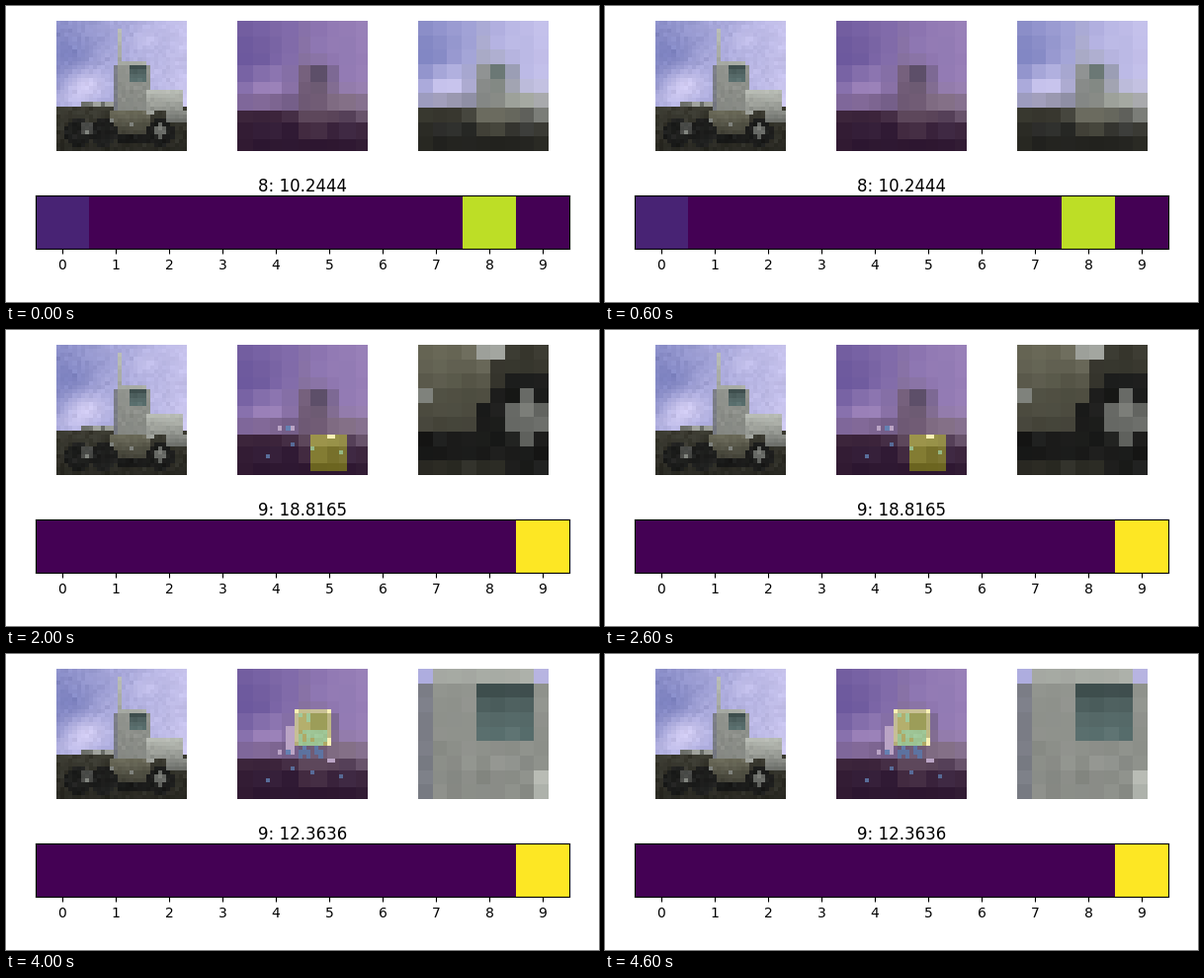
Animation, 600 px wide and 300 px high, one loop 5 s. Source, as a matplotlib script:

```python
import numpy as np
import matplotlib.pyplot as plt
from matplotlib.animation import FuncAnimation

W, H = 600, 300
N, G = 32, 9            # image side, glimpse side
ALPHA = 0.34

# title, class probabilities, glimpse corner (col, row)
STEPS = [
    ("8: 10.2444", {0: 0.1, 8: 0.9}, None),
    ("9: 13.4599", {8: 0.2, 9: 0.8}, (6, 20)),
    ("9: 18.8165", {9: 1.0}, (18, 22)),
    ("9: 14.9782", {9: 1.0}, (12, 14)),
    ("9: 12.3636", {9: 1.0}, (14, 10)),
]

rng = np.random.default_rng(4)
rows, cols = np.mgrid[0:N, 0:N]
BLUE, LILAC = np.array([118, 124, 188]), np.array([208, 203, 242])
STEEL, OLIVE = np.array([1, 1.02, 0.98]), np.array([1.03, 1.02, 0.86])


def blob(c, r, w, h):
    return np.exp(-((cols - c) / w) ** 2 - ((rows - r) / h) ** 2)


def make_sky():
    """Blue to lilac from left to right, with soft clouds."""
    t = 0.22 + 0.7 * cols / N
    t += 0.5 * blob(7, 15, 6, 4) + 0.4 * blob(1, 19, 7, 3)
    t -= 0.2 * blob(4, 8, 5, 4)
    for c, r in rng.uniform(0, N, (24, 2)):
        t += rng.normal(0, 0.1) * blob(c, r, 3.5, 2.5)
    t = np.clip(t, 0, 1.1)[..., None]
    return (1 - t) * BLUE + t * LILAC


def make_scene():
    """A lorry in flat grey blocks, one cell per pixel."""
    img = make_sky()

    def block(c, r, w, h, top, bottom=None, tint=STEEL):
        shade = np.linspace(top, top if bottom is None else bottom, h)
        img[r:r + h, c:c + w] = shade[:, None, None] * tint

    def disc(c, r, radius, level):
        img[np.hypot(cols - c, rows - r) <= radius] = level * STEEL

    block(0, 21, N, 11, 58, 40, OLIVE)          # road and flatbed
    block(6, 20, 9, 1, 112)
    block(15, 2, 1, 9, 185, 160)                # exhaust
    block(14, 11, 9, 11, 146, 134)              # cab
    block(15, 10, 7, 1, 168)
    img[11:22, 14] *= [0.88, 0.88, 0.98]
    block(18, 11, 4, 4, 78, 108, [0.85, 1.05, 1.04])
    block(22, 17, 9, 5, 186, 148)               # hood
    block(27, 22, 5, 3, 136, 112)
    block(13, 22, 10, 6, 104, 66, OLIVE)        # tank and steps
    block(15, 28, 9, 2, 25)
    block(22, 22, 2, 1, 162)

    for c in (5, 11, 25):                       # wheels
        disc(c, 27, 3.2, 30)
    disc(7, 26, 1.5, 72)
    disc(25, 26.5, 1.5, 103)
    for c, r in ((7, 27), (13, 24), (18, 25), (25, 26), (9, 20), (12, 20)):
        img[r, c:c + 1 + (r == 20)] = 128 * STEEL + 30 * (r == 20)

    img += rng.normal(0, 3.5, (N, N, 1))
    return np.clip(img, 0, 255) / 255


def pool(img):
    lo = np.arange(G) * N // G
    hi = -(-np.arange(1, G + 1) * N // G)
    return np.array([[img[a:b, c:d].mean((0, 1)) for c, d in zip(lo, hi)]
                     for a, b in zip(lo, hi)])


scene = make_scene()
coarse = pool(scene)
idx = np.arange(N) * G // N
blurred = coarse[idx][:, idx]


def window(corner):
    c, r = corner
    return slice(r, r + G), slice(c, c + G)


def mask(*corners):
    m = np.zeros((N, N))
    for corner in filter(None, corners):
        m[window(corner)] = 1
    return m


def memory(step):
    """Blurred scene, lit up where past glimpses found bright detail."""
    seen = mask(*(s[2] for s in STEPS[:step + 1])) > 0
    fine = scene.mean(2)
    lit = seen & (fine > np.maximum(blurred.mean(2), 0.45))
    out = blurred.copy()
    out[lit] = np.clip(scene[lit] * [0.78, 1.25, 1.5], 0, 1)
    out[lit & (fine > 0.61)] = [0.97, 0.97, 1]
    return out


fig = plt.figure(figsize=(W / 100, H / 100), dpi=100, facecolor="white")


def panel(x, y, w, h):
    return fig.add_axes([x / W, 1 - (y + h) / H, w / W, h / H])


def show(ax, data, **kw):
    return ax.imshow(data, aspect="auto", interpolation="nearest", **kw)


# a hair inside the pixel edges, so rounding never adds a column
left, mid, right = (panel(x + 0.01, 15.01, 131.98, 131.98)
                    for x in (51, 234, 417))
for ax in (left, mid, right):
    ax.axis("off")
show(left, scene)
mem_im = show(mid, blurred)
mask_im = show(mid, mask(), cmap="viridis", vmin=0, vmax=1, alpha=ALPHA)
view_im = show(right, coarse)

bar = panel(29.99, 192, 540, 54)
bar_im = show(bar, np.zeros((1, 10)), cmap="viridis", vmin=0, vmax=1)
bar.set_xticks(range(10))
bar.set_yticks([])
title = fig.text(0.5, 1 - 188 / H, "", ha="center", va="baseline", fontsize=12)


def draw(i):
    text, probs, corner = STEPS[i]
    title.set_text(text)
    bar_im.set_data([[probs.get(k, 0) for k in range(10)]])
    mem_im.set_data(memory(i))
    mask_im.set_data(mask(corner))
    view_im.set_data(scene[window(corner)] if corner else coarse)
    return title, bar_im, mem_im, mask_im, view_im


anim = FuncAnimation(fig, draw, frames=len(STEPS), interval=1000,
                     repeat=True, repeat_delay=0)
plt.show()
```
